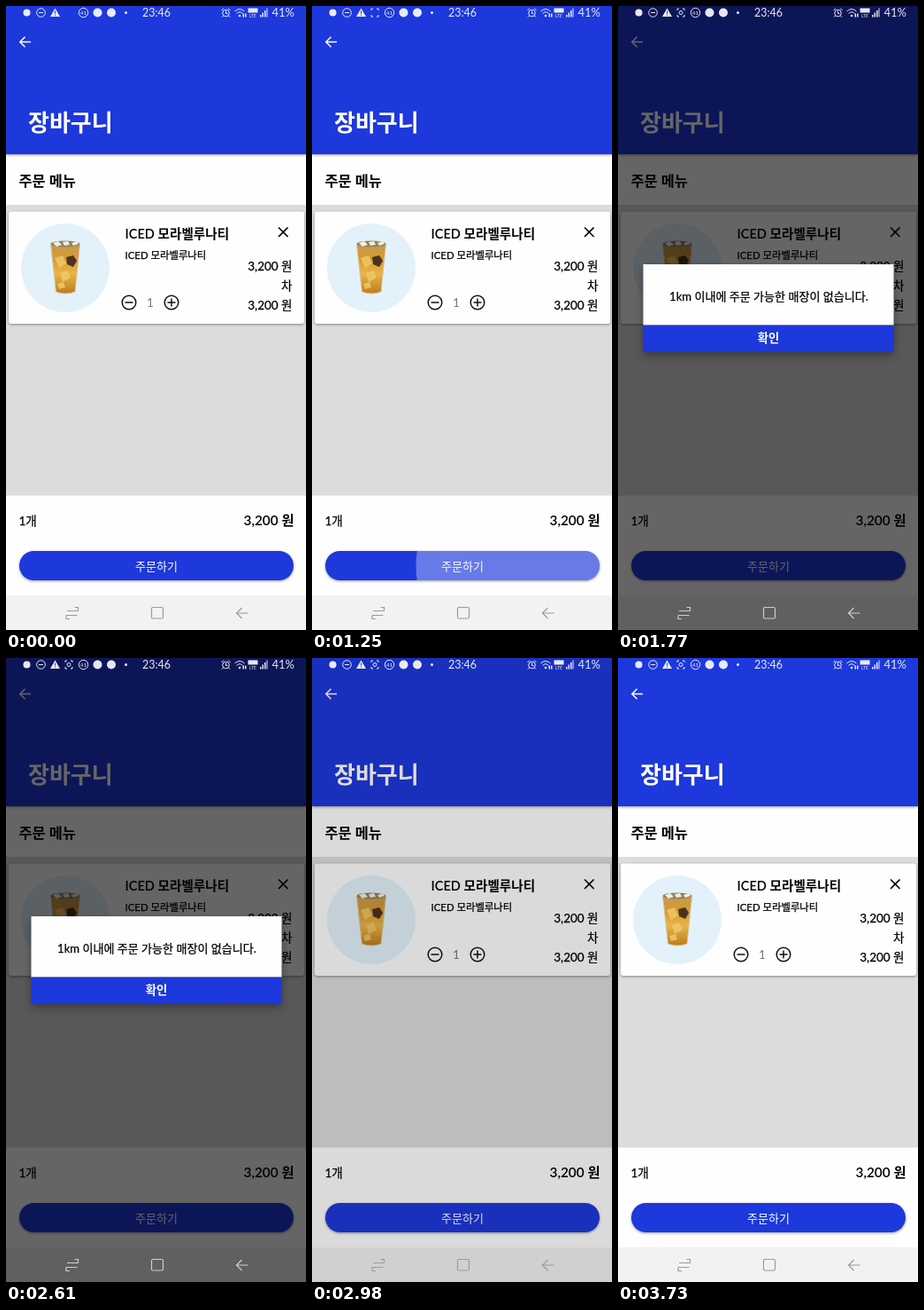
Recreate the animation shown at these times as an HTML page. Size 339 px wide and 703 px high, loop 4.14 s.

```html
<!DOCTYPE html>
<html lang="ko">
<head>
<meta charset="utf-8">
<style>
  html, body { margin: 0; height: 100%; overflow: hidden; }
  svg { display: block; width: 100%; height: 100%; font-family: Lato, "Noto Sans CJK KR", "Noto Sans CJK", sans-serif; }
  .line { fill: none; stroke: currentColor; }
  .end { text-anchor: end; }
  .mid { text-anchor: middle; }
  .bold { font-weight: 600; }
  .price { font-size: 13.5px; }
  .medium { stroke: #000; stroke-width: .25px; }
  .shadow { filter: drop-shadow(0 1px 1.5px #0006); }
</style>
</head>
<body>
<svg viewBox="0 0 339 703">
  <defs>
    <clipPath id="orderClip"><rect x="15" y="614" width="310" height="33" rx="16.5"/></clipPath>
    <clipPath id="okClip"><rect x="28.5" y="359.6" width="283" height="30"/></clipPath>
    <linearGradient id="tea" x2="0" y2="1">
      <stop stop-color="#c49a55"/><stop offset=".3" stop-color="#d79a2c"/>
      <stop offset=".6" stop-color="#e8b548"/><stop offset="1" stop-color="#bd7c1c"/>
    </linearGradient>
  </defs>

  <rect width="339" height="703" fill="#dcdcdc"/>
  <rect y="160" width="339" height="64" fill="#fefefe"/>
  <rect width="339" height="167" fill="#1d38db" class="shadow"/>
  <path class="line" color="#fff" stroke-width="1.5" d="M28 40.5H16M21.5 34.8L15.8 40.5L21.5 46.2"/>
  <text x="25" y="140.5" font-size="26" class="bold" fill="#fff">장바구니</text>
  <text x="14.5" y="203" font-size="16.4" class="bold">주문 메뉴</text>

  <rect x="3" y="231.5" width="334" height="126.5" rx="3" fill="#fefefe" class="shadow"/>
  <circle cx="67" cy="295" r="50" fill="#e3f2fa"/>
  <g id="drink">
    <path fill="url(#tea)" d="M50.5 268H83.5L78 322Q67 326 56.5 322Z"/>
    <path fill="#f0c96b" d="M55 284l9-3 4 9-8 5zM61 301l8-3 4 8-9 5zM58 313l7-2 2 6-7 2z" opacity=".8"/>
    <path fill="#4b3320" d="M68 283l8-2 4 6-4 7-7-3z"/>
    <ellipse cx="67" cy="268" rx="16.5" ry="3.5" fill="#94805f"/>
    <path fill="#f3eee2" d="M53 267l6-2 4 4-6 2zM64 266l6-1 2 4-6 1zM74 267l6-2 2 3-6 2z"/>
    <path class="line" color="#d3c3a3" d="M50.5 268L56.5 322Q67 326 78 322L83.5 268"/>
  </g>
  <text x="134.5" y="261.5" font-size="14.6" class="bold">ICED 모라벨루나티</text>
  <text x="134.5" y="284.5" font-size="11.4" class="medium">ICED 모라벨루나티</text>
  <path class="line" color="#000" stroke-width="1.7" d="M308 249.5l10.5 10.5M318.5 249.5l-10.5 10.5"/>
  <g class="end price medium">
    <text x="323.5" y="297.5">3,200 원</text>
    <text x="323.5" y="319.5">차</text>
    <text x="323.5" y="341.5">3,200 원</text>
  </g>
  <path class="line" color="#111" stroke-width="1.5" d="M134.5 334h9M182.5 334h9M187 329.5v9"/>
  <g class="line" color="#111" stroke-width="1.5">
    <circle cx="139" cy="334" r="7.8"/><circle cx="187" cy="334" r="7.8"/>
  </g>
  <text x="163" y="339" class="mid price" fill="#777">1</text>

  <rect y="551.5" width="339" height="113" fill="#fefefe"/>
  <text x="14.5" y="585" class="price medium">1개</text>
  <text x="325.5" y="585" font-size="15.3" class="end bold">3,200 원</text>
  <rect x="15" y="614" width="310" height="33" rx="16.5" fill="#1d38db" class="shadow"/>
  <g clip-path="url(#orderClip)"><circle id="orderRipple" cx="235" cy="631" fill="#fff"/></g>
  <text x="170" y="635.5" class="mid" font-size="13" fill="#fff">주문하기</text>
  <rect y="664" width="339" height="39" fill="#f2f2f2"/>

  <rect id="barrier" width="339" height="703"/>

  <g id="dialog">
    <g style="filter:drop-shadow(0 4px 5px #0005)">
      <rect x="28.5" y="291" width="283" height="68.6" fill="#fefefe"/>
      <rect x="28.5" y="359.6" width="283" height="30" fill="#1d38db"/>
    </g>
    <text x="170.5" y="331.5" font-size="13.05" class="mid medium">1km 이내에 주문 가능한 매장이 없습니다.</text>
    <g clip-path="url(#okClip)"><circle id="okRipple" cx="250" cy="375" fill="#fff"/></g>
    <text x="170" y="379" font-size="13.3" class="mid bold" fill="#fff">확인</text>
  </g>

  <g fill="#fff" color="#fff" opacity=".9">
    <circle cx="23.5" cy="7.5" r="4"/>
    <g class="line">
      <circle cx="39.5" cy="7.5" r="4.8"/><path d="M37 7.5h5"/>
      <circle cx="87.5" cy="7.5" r="5.2"/>
    </g>
    <path d="M55.5 2.5L61 12H50Z"/>
    <path d="M55.5 5.5v3M55.5 9.5v1.2" stroke="#1d38db"/>
    <g id="capture">
      <path class="line" d="M67 5V3h2M73 3h2v2M75 10v2h-2M69 12h-2v-2"/>
      <circle id="captureDot" class="line" cx="71" cy="7.5" r="2"/>
    </g>
    <text x="87.5" y="10" class="mid" font-size="6.5">41</text>
    <circle cx="103.5" cy="7.5" r="5"/><circle cx="119" cy="7.5" r="5"/><circle cx="135.5" cy="7.5" r="1.5"/>
    <text x="154" y="12" font-size="12.5">23:46</text>
    <g class="line">
      <circle cx="248.5" cy="8" r="3.8"/>
      <path d="M248.5 5.5v3h2M243.5 5l2.5-2.5M253.5 5l-2.5-2.5M245.5 11l-1.5 1.5M251.5 11l1.5 1.5"/>
      <path d="M258.5 6q5.5-5 11 0M260.5 8.5q3.5-3.5 7 0"/>
    </g>
    <circle cx="264" cy="11" r="1.3"/>
    <path d="M267.5 8.5h1.5v4h-1.5zM270 8.5h1.5v4h-1.5z"/>
    <rect x="273.5" y="2.5" width="11" height="5"/>
    <text x="279" y="12.8" class="mid" font-size="5">LTE</text>
    <path d="M287 10h1.5v2.5h-1.5zM289.5 7.5h1.5v5h-1.5zM292 5h1.5v7.5h-1.5zM294.5 2.5h1v10h-1z"/>
    <text x="326" y="12" class="end" font-size="13">41%</text>
  </g>

  <path id="nav" class="line" stroke-width="1.2" d="M81.5 681.5H69M77.5 677.5h4v4M68 686.5h12.5M68 686.5v4h4
    M166 677.5h10q1.5 0 1.5 1.5v9.5q0 1.5-1.5 1.5h-10q-1.5 0-1.5-1.5v-9.5q0-1.5 1.5-1.5zM273.5 684H261M266.5 678l-6 6 6 6"/>
</svg>
<script>
const LOOP = 4140;
const set = (id, attrs) => {
  for (const k in attrs) document.getElementById(id).setAttribute(k, attrs[k]);
};
const ramp = (t, from, to) => Math.min(1, Math.max(0, (t - from) / (to - from)));
const smooth = p => p * p * (3 - 2 * p);
const easeOut = p => 1 - (1 - p) ** 3;

function ripple(id, t, start, speed, fadeFrom, fadeTo) {
  const r = t < start ? 0 : Math.min(260, 15 + (t - start) * speed);
  set(id, { r, opacity: 0.33 * ramp(t, start, start + 60) * (1 - ramp(t, fadeFrom, fadeTo)) });
}

function draw() {
  const t = performance.now() % LOOP;
  const dim = smooth(ramp(t, 1350, 1535)) * (1 - smooth(ramp(t, 2806, 3062)));
  const shown = easeOut(ramp(t, 1350, 1510)) * (1 - ramp(t, 2810, 2930));
  set("barrier", { opacity: 0.6 * dim });
  set("dialog", { opacity: shown });
  ripple("orderRipple", t, 1050, 0.51, 1480, 1720);
  ripple("okRipple", t, 2610, 0.355, 2800, 2950);
  set("capture", { opacity: ramp(t, 440, 950) });
  set("captureDot", { opacity: ramp(t, 1600, 1770) });
  const grey = Math.round(155 + 50 * shown);
  set("nav", { color: `rgb(${grey},${grey},${grey})` });
  requestAnimationFrame(draw);
}
draw();
</script>
</body>
</html>
```
